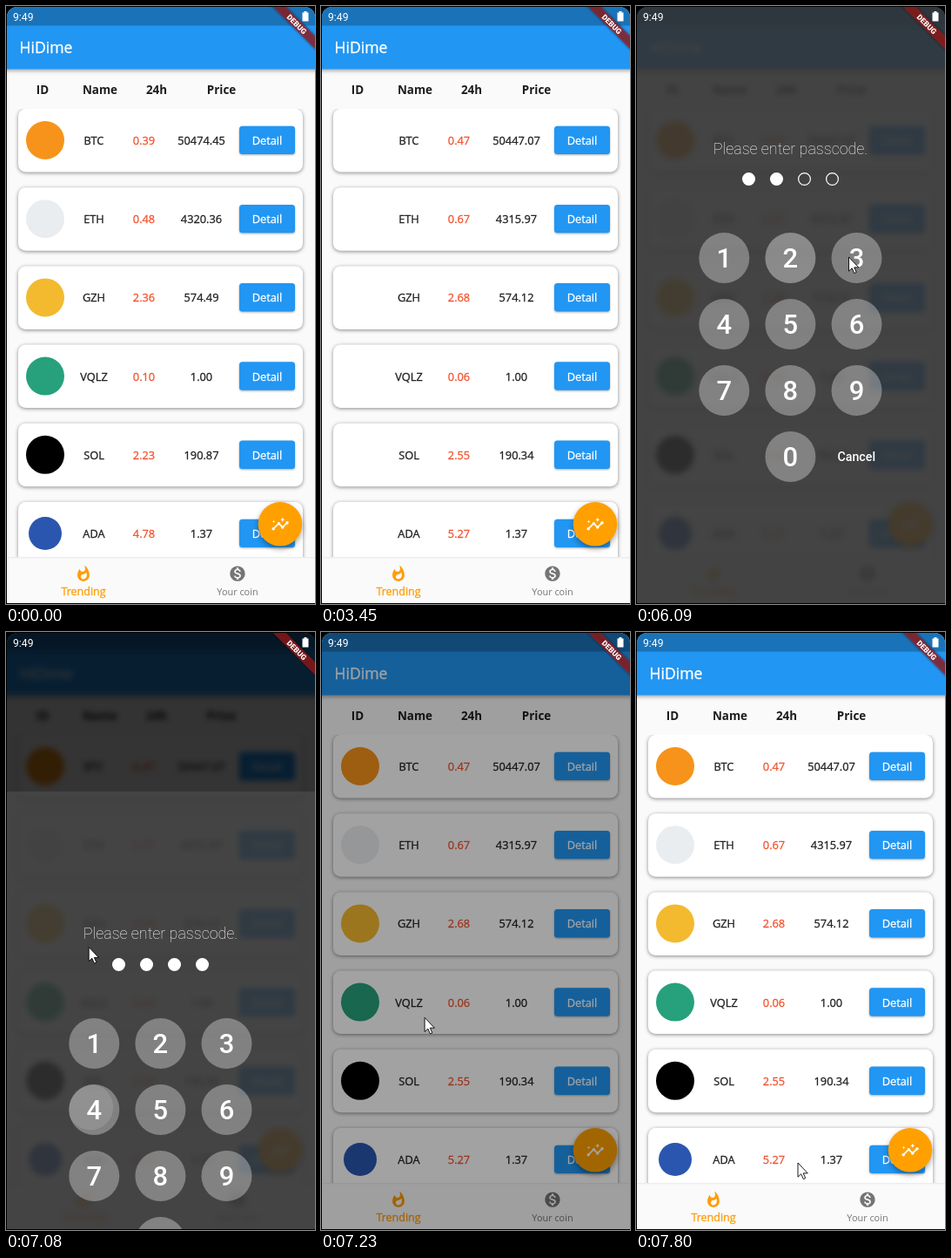
An HTML page that plays this animation: 355 by 686 pixels, repeating every 8 s.

```html
<!DOCTYPE html>
<html lang="en">
<head>
<meta charset="utf-8">
<title>HiDime</title>
<style>
html, body { margin: 0; width: 100%; height: 100%; overflow: hidden; background: #000; }
svg { display: block; }
text { font-family: "Open Sans", "Noto Sans", sans-serif; }
.mid { text-anchor: middle; }
.head { font-size: 13.4px; font-weight: 700; fill: #1d1d1d; }
/* a thin outline in the text colour gives a medium weight */
.medium { stroke: currentColor; fill: currentColor; stroke-width: .3px; }
.cell { font-size: 12.8px; color: #212121; }
.change { color: #f4512c; }
.btn { font-size: 12.8px; color: #fff; }
.roboto text { font-family: Roboto, "Liberation Sans", sans-serif; fill: #fff; }
.card { filter: drop-shadow(0 1.5px 2px rgba(0,0,0,.46)); }
.raised { filter: drop-shadow(0 1.2px 1px rgba(0,0,0,.32)); }
.fab { filter: drop-shadow(0 3px 3px rgba(0,0,0,.35)); }
.bar { filter: drop-shadow(0 2px 2px rgba(0,0,0,.32)); }
</style>
</head>
<body>
<svg id="stage" width="355" height="686" viewBox="0 0 355 686">
  <clipPath id="screen"><rect x="1" y="1" width="354" height="720" rx="12"/></clipPath>
  <g clip-path="url(#screen)">
    <g id="app">
      <rect x="-20" y="-20" width="395" height="730" fill="#fafafa"/>
      <g id="list">
        <text class="head mid" x="42" y="101">ID</text>
        <text class="head mid" x="108" y="101">Name</text>
        <text class="head mid" x="173" y="101">24h</text>
        <text class="head mid" x="247.500" y="101">Price</text>
        <svg id="rows" y="118" width="355" height="514"></svg>
        <circle class="fab" cx="315" cy="594.300" r="25.300" fill="#ffa000"/>
        <path fill="#fff" transform="translate(304.600 584) scale(.875)" d="M21 8c-1.450 0-2.260 1.440-1.930 2.510l-3.550 3.560c-.3-.09-.74-.09-1.040 0l-2.550-2.550C12.270 10.450 11.460 9 10 9c-1.450 0-2.270 1.440-1.930 2.520l-4.560 4.550C2.440 15.740 1 16.550 1 18c0 1.100.9 2 2 2 1.450 0 2.260-1.440 1.930-2.510l4.550-4.560c.3.09.74.09 1.040 0l2.550 2.550C12.730 16.550 13.540 18 15 18c1.450 0 2.270-1.440 1.930-2.520l3.560-3.550C21.560 12.260 23 11.450 23 10c0-1.100-.9-2-2-2zM15 9l.94-2.070L18 6l-2.060-.93L15 3l-.92 2.070L12 6l2.080.93zM3.500 11L4 9l2-.5L4 8l-.5-2L3 8l-2 .5L3 9z"/>
      </g>
      <path id="spinner" fill="none" stroke="#9e9e9e" stroke-width="3.460" stroke-linecap="square"/>
      <rect class="bar" x="-20" y="-20" width="395" height="92.500" fill="#2196f3"/>
      <rect x="-20" y="-20" width="395" height="42.500" fill="#1a73b9"/>
      <text class="medium" x="15.500" y="54" font-size="17.600" color="#fff">HiDime</text>
      <rect x="-20" y="632" width="395" height="1.500" fill="#ececec"/>
      <rect x="-20" y="633.500" width="395" height="72" fill="#fafafa"/>
      <path fill="#ff9d0a" transform="translate(78.600 641) scale(.865)" d="M13.500.67s.74 2.650.74 4.800c0 2.060-1.350 3.730-3.410 3.730-2.070 0-3.630-1.670-3.630-3.730l.03-.36C5.210 7.510 4 10.620 4 14c0 4.420 3.580 8 8 8s8-3.580 8-8C20 8.610 17.410 3.800 13.500.67zM11.710 19c-1.780 0-3.220-1.400-3.220-3.140 0-1.620 1.050-2.760 2.810-3.120 1.770-.36 3.600-1.210 4.620-2.580.39 1.290.59 2.650.59 4.040 0 2.650-2.150 4.800-4.800 4.800z"/>
      <path fill="#757575" transform="translate(255.600 640.800) scale(.865)" d="M12 2C6.480 2 2 6.480 2 12s4.480 10 10 10 10-4.480 10-10S17.520 2 12 2zm1.410 16.090V20h-2.670v-1.930c-1.710-.36-3.160-1.460-3.270-3.400h1.960c.1 1.050.82 1.870 2.650 1.870 1.960 0 2.400-.98 2.400-1.590 0-.83-.44-1.610-2.670-2.140-2.480-.6-4.180-1.620-4.180-3.670 0-1.720 1.390-2.840 3.110-3.210V4h2.670v1.950c1.860.45 2.790 1.860 2.850 3.390H14.300c-.05-1.110-.64-1.870-2.220-1.870-1.500 0-2.400.68-2.400 1.640 0 .84.65 1.390 2.670 1.910s4.180 1.390 4.180 3.910c-.01 1.830-1.380 2.830-3.120 3.160z"/>
      <text class="medium mid" x="89" y="675.500" font-size="12.500" color="#ff9d0a">Trending</text>
      <text class="mid" x="266" y="676" font-size="10.900" fill="#757575">Your coin</text>
    </g>
    <rect id="dim" width="355" height="686"/>
    <g id="sheet" class="roboto">
      <rect width="355" height="686" fill="#545454" fill-opacity=".533"/>
      <text class="mid" x="177.500" y="169.500" font-size="17.900" font-weight="200">Please enter passcode.</text>
      <g id="dots" stroke="#fff" stroke-width="1.200"></g>
      <g id="keys"></g>
      <text class="mid" x="253.300" y="522" font-size="14.200" font-weight="500">Cancel</text>
    </g>
    <g class="roboto">
      <text x="8" y="16.500" font-size="12.200">9:49</text>
      <path d="M340.500 7.500h2v-1.500h3v1.500h2v10h-7z" fill="#fff"/>
      <g transform="translate(355 0) rotate(45)">
        <rect x="-40" y="24.200" width="80" height="10.600" fill-opacity=".5" style="filter:blur(1.500px)"/>
        <rect x="-40" y="24.200" width="80" height="10.600" fill="#b71c1c" fill-opacity=".63"/>
        <text class="mid" y="32.700" font-size="8.700" font-weight="900">DEBUG</text>
      </g>
    </g>
  </g>
  <rect y="685" width="355" height="1"/>
  <path id="cursor" d="M0 0V16.200L3.700 12.800L6.300 18.600L8.700 17.500L6.200 11.900H11.300Z" fill="#fff" stroke="#000" stroke-width=".9"/>
</svg>
<script>
const $ = id => document.getElementById(id);
const show = (el, on) => el.setAttribute('visibility', on ? 'inherit' : 'hidden');
const clamp = x => Math.min(1, Math.max(0, x));

// name, badge colour, badge radius, then change and price before and after the reload
const coins = [
  ['BTC', '#f7931a', 22, '0.39', '50474.45', '0.47', '50447.07'],
  ['ETH', '#eaedef', 22, '0.48', '4320.36', '0.67', '4315.97'],
  ['GZH', '#f3ba2f', 22, '2.36', '574.49', '2.68', '574.12'],
  ['VQLZ', '#26a17b', 22, '0.10', '1.00', '0.06', '1.00'],
  ['SOL', '#000', 22, '2.23', '190.87', '2.55', '190.34'],
  ['ADA', '#2a56b0', 19, '4.78', '1.37', '5.27', '1.37']
];
$('rows').innerHTML = coins.map(([name, color, r], i) => `<g transform="translate(0 ${i * 90.2})">
  <rect class="card" x="14" width="327" height="72.500" rx="8.500" fill="#fff"/>
  <circle class="badge" cx="45" cy="36" r="${r}" fill="${color}"/>
  <text class="cell medium mid" x="101" y="41">${name}</text>
  <text class="cell medium mid change" x="158.500" y="41"></text>
  <text class="cell medium mid price" x="224.500" y="41"></text>
  <rect class="raised" x="268" y="19.700" width="64" height="32.400" rx="3.500" fill="#2196f3"/>
  <text class="btn medium mid" x="300" y="41">Detail</text></g>`).join('');
const all = name => [...document.getElementsByClassName(name)];
const badges = all('badge'), changes = all('change'), prices = all('price');

$('dots').innerHTML = [0, 1, 2, 3].map(i => `<circle cx="${129.5 + i * 32}" cy="198.500" r="6.900"/>`).join('');
const dots = [...$('dots').children];

const taps = [[5510, 1, 87, 281], [5830, 2, 168, 286], [6150, 3, 246, 288], [6950, 4, 97, 362]];
$('keys').innerHTML = [1, 2, 3, 4, 5, 6, 7, 8, 9, 0].map((n, i) => {
  const x = n ? 101.3 + i % 3 * 76.1 : 177.4, y = 289 + Math.floor(i / 3) * 76;
  const circle = `<circle cx="${x}" cy="${y}" r="29"`;
  const tap = taps.find(t => t[1] === n);
  return circle + ' fill="#fff" fill-opacity=".33"/>' + (tap ? `<clipPath id="key${n}">${circle}/></clipPath>
    <g clip-path="url(#key${n})"><circle class="ripple" cx="${tap[2]}" cy="${tap[3]}" fill="#fff"/></g>` : '') +
    `<text class="mid" x="${x}" y="${y + 11}" font-size="31" font-weight="500">${n}</text>`;
}).join('');
const ripples = all('ripple');

const path = [
  [4800, 347, 447], [5340, 87, 281], [5560, 87, 281], [5790, 168, 286], [5880, 168, 286],
  [6110, 246, 288], [6330, 246, 288], [6900, 95, 361], [7080, 95, 361], [7230, 119, 442],
  [7420, 140, 500], [7800, 186, 609], [8001, 186, 609]
];

function bezier(x1, y1, x2, y2) {
  const at = (a, b, s) => 3 * a * s * (1 - s) ** 2 + 3 * b * s * s * (1 - s) + s ** 3;
  return x => {
    let lo = 0, hi = 1;
    for (let i = 0; i < 18; i++) {
      const m = (lo + hi) / 2;
      if (at(x1, x2, m) < x) lo = m; else hi = m;
    }
    return at(y1, y2, lo);
  };
}
const ease = bezier(.25, .1, .25, 1), swift = bezier(.4, 0, .2, 1);

function drawSpinner(t) {
  const ms = t < 2080 ? 0 : Math.min(t, 2890) - 1520;
  const f = ms / 1333 % 1;
  const tail = 1.5 * swift(clamp(f * 2 - 1));
  const sweep = Math.max(1.5 * swift(clamp(f * 2)) - tail, .001) * Math.PI;
  const from = (-.5 + tail + ms / 1111 + f / 2) * Math.PI;
  const point = a => `${177.5 + 15.55 * Math.cos(a)} ${353 + 15.55 * Math.sin(a)}`;
  $('spinner').setAttribute('d',
    `M${point(from)}A15.550 15.550 0 ${+(sweep > Math.PI)} 1 ${point(from + sweep)}`);
}

// lock sheet: 0 closed, 1 open; it closes in steps of 30 ms
function sheetOpen(t) {
  if (t < 4090) return 0;
  if (t < 6000) return clamp((t - 4060) / 160);
  return clamp(1 - (Math.floor(t / 30) * 30 - 7053) / 243);
}

function draw(t) {
  const loading = t >= 1980 && t < 3450, fresh = t >= 3450;
  show($('list'), !loading);
  show($('spinner'), loading);
  if (loading) drawSpinner(t);
  coins.forEach((coin, i) => {
    changes[i].textContent = coin[fresh ? 5 : 3];
    prices[i].textContent = coin[fresh ? 6 : 4];
    show(badges[i], !loading && (!fresh || t >= (i ? 3810 : 4090)));
  });

  const open = sheetOpen(t);
  const drop = 2.4 * 686 * (1 - open), covered = drop < 686;
  $('app').style.filter = covered ? 'blur(3px)' : 'none';
  $('dim').setAttribute('opacity', .8 * ease(open));
  show($('sheet'), covered);
  $('sheet').setAttribute('transform', `translate(0 ${drop})`);
  taps.forEach(([start], i) => {
    const dt = t - start;
    dots[i].setAttribute('fill', dt >= 0 ? '#fff' : 'none');
    ripples[i].setAttribute('r', Math.min(60, Math.max(0, dt / 5)));
    ripples[i].setAttribute('opacity', dt < 0 ? 0 : .13 * clamp(1.3 - dt / 350));
  });

  show($('cursor'), t >= 4800);
  const k = path.findIndex(p => t < p[0]);
  if (k > 0) {
    const [t0, x0, y0] = path[k - 1], [t1, x1, y1] = path[k];
    let u = (t - t0) / (t1 - t0);
    if (t < 7080) u = u * u * (3 - 2 * u);
    $('cursor').setAttribute('transform', `translate(${x0 + (x1 - x0) * u} ${y0 + (y1 - y0) * u})`);
  }
}

const begin = performance.now();
function tick() {
  draw((performance.now() - begin) % 8000);
  requestAnimationFrame(tick);
}
tick();
</script>
</body>
</html>
```
